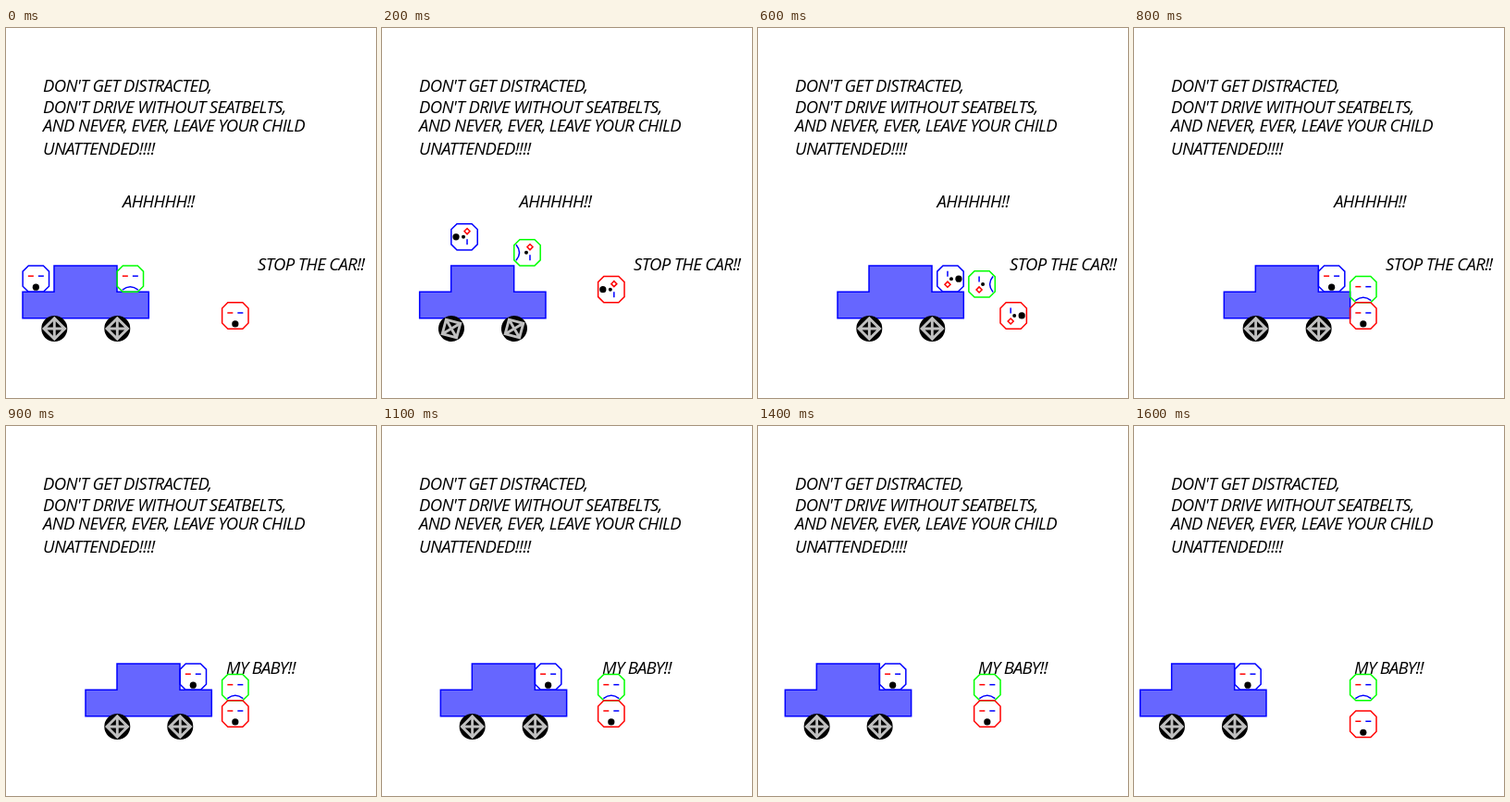
Animation of 400 by 400 pixels, one loop 1700 ms. Source, as an HTML page:

```html
<!DOCTYPE html>
<html lang="en">
<head>
<meta charset="utf-8">
<style>
html, body { margin: 0; width: 100%; height: 100%; overflow: hidden; background: #fff; }
svg { display: block; width: 100vw; height: 100vh; }
text { font: italic 400 18.5px "Open Sans", "Noto Sans", sans-serif; font-stretch: 75%; letter-spacing: -.6px; }
.line { fill: none; stroke-width: 1.5; }
</style>
</head>
<body>
<svg viewBox="0 0 400 400">
  <defs>
    <g id="wheel">
      <circle r="14"/>
      <path d="M0-11.3L11.3 0L0 11.3L-11.3 0ZM0-11.3V11.3M-11.3 0H11.3" fill="none" stroke="#c0c0c0" stroke-width="2.9"/>
    </g>
    <path id="shell" d="M-8-14.2H8L14.2-8V8L8 14.2H-8L-14.2 8V-8Z"/>
    <path id="blueEye" d="M2.5-3H8.5" stroke="#00f"/>
    <path id="dash" d="M-8.5-3H-2.5" stroke="#f00"/>
    <g id="open"><path d="M-9-3L-6-6L-3-3L-6 0Z" stroke="#f00"/><circle cy="1" r="2" fill="#000"/></g>
    <circle id="shout" cy="9" r="3.6" fill="#000"/>
    <path id="frown" d="M-8.5 12Q0 5 8.5 12" stroke="#00f"/>
  </defs>
  <text x="40" y="69">DON'T GET DISTRACTED,</text>
  <text x="40" y="92">DON'T DRIVE WITHOUT SEATBELTS,</text>
  <text x="40" y="112">AND NEVER, EVER, LEAVE YOUR CHILD</text>
  <text x="40" y="137">UNATTENDED!!!!</text>
  <text id="scream" y="194">AHHHHH!!</text>
  <text id="stop" x="272" y="262">STOP THE CAR!!</text>
  <text id="baby" x="238" y="268">MY BABY!!</text>
  <g id="car">
    <path d="M0 285.3H34V257H102V285.3H136.3V313.7H0Z" fill="#66f" stroke="#00f" stroke-width="1.5"/>
    <use class="w" href="#wheel"/>
    <use class="w" href="#wheel"/>
  </g>
  <g id="kid" class="line"></g>
  <g id="mate" class="line"></g>
  <g id="mum" class="line"></g>
</svg>
<script>
const FRAME = 100, COUNT = 17, STEP = 34 / 3, ARM = 14.17;
const $ = id => document.getElementById(id);
const wheels = [...document.querySelectorAll('.w')];
const use = id => `<use href="#${id}"/>`;

const heads = { kid: ['#00f', 'shout'], mate: ['#0f0', 'frown'], mum: ['#f00', 'shout'] };
for (const id in heads) {
  const [color, mouth] = heads[id];
  $(id).innerHTML = `<g stroke="${color}">${use('shell')}</g>${use('blueEye')}` +
    `<g class="shut">${use('dash')}</g><g class="wide">${use('open')}</g>${use(mouth)}`;
}

// Pivot paths: [step, x, y], linear in between
const paths = {
  kid: [[0, 46.5, 257], [2, 103.2, 240], [4, 148.5, 251.3], [6, 193.8, 257], [8, 227.8, 257]],
  mate: [[0, 148.5, 257], [4, 193.8, 257], [8, 262, 268.5]],
  mum: [[0, 262, 296.8], [14, 262, 296.8], [16, 262, 308.1]]
};

function along(keys, n) {
  let i = 0;
  while (i < keys.length - 2 && n > keys[i + 1][0]) i++;
  const [a, ax, ay] = keys[i], [b, bx, by] = keys[i + 1];
  const k = Math.min(1, (n - a) / (b - a));
  return [ax + (bx - ax) * k, ay + (by - ay) * k];
}

const show = (el, on) => { el.style.display = on ? '' : 'none'; };

function draw(n) {
  const back = Math.max(0, n - 8) * STEP;
  const carX = 18 + Math.min(n, 7) * STEP - back;
  const turn = Math.min(n, 8) * 45;
  $('car').setAttribute('transform', `translate(${carX})`);
  const spin = n < 7 ? n * 30 : 0;
  wheels.forEach((w, i) => w.setAttribute('transform', `translate(${34.3 + i * 68} 325) rotate(${spin})`));

  for (const id in paths) {
    const [x, y] = along(paths[id], n);
    const shift = id === 'kid' ? back : 0;
    const el = $(id), wide = n === 2 || n === 6;
    el.setAttribute('transform', `translate(${x - shift} ${y}) rotate(${turn}) translate(${-ARM} ${ARM})`);
    show(el.querySelector('.wide'), wide);
    show(el.querySelector('.shut'), !wide);
  }

  $('scream').setAttribute('x', 126 + n * 11.27);
  show($('scream'), n < 9);
  show($('stop'), n < 9);
  show($('baby'), n >= 9);
}

let last = -1;
function tick() {
  const n = Math.floor(performance.now() / FRAME) % COUNT;
  if (n !== last) draw(last = n);
  requestAnimationFrame(tick);
}
draw(0);
tick();
</script>
</body>
</html>
```
